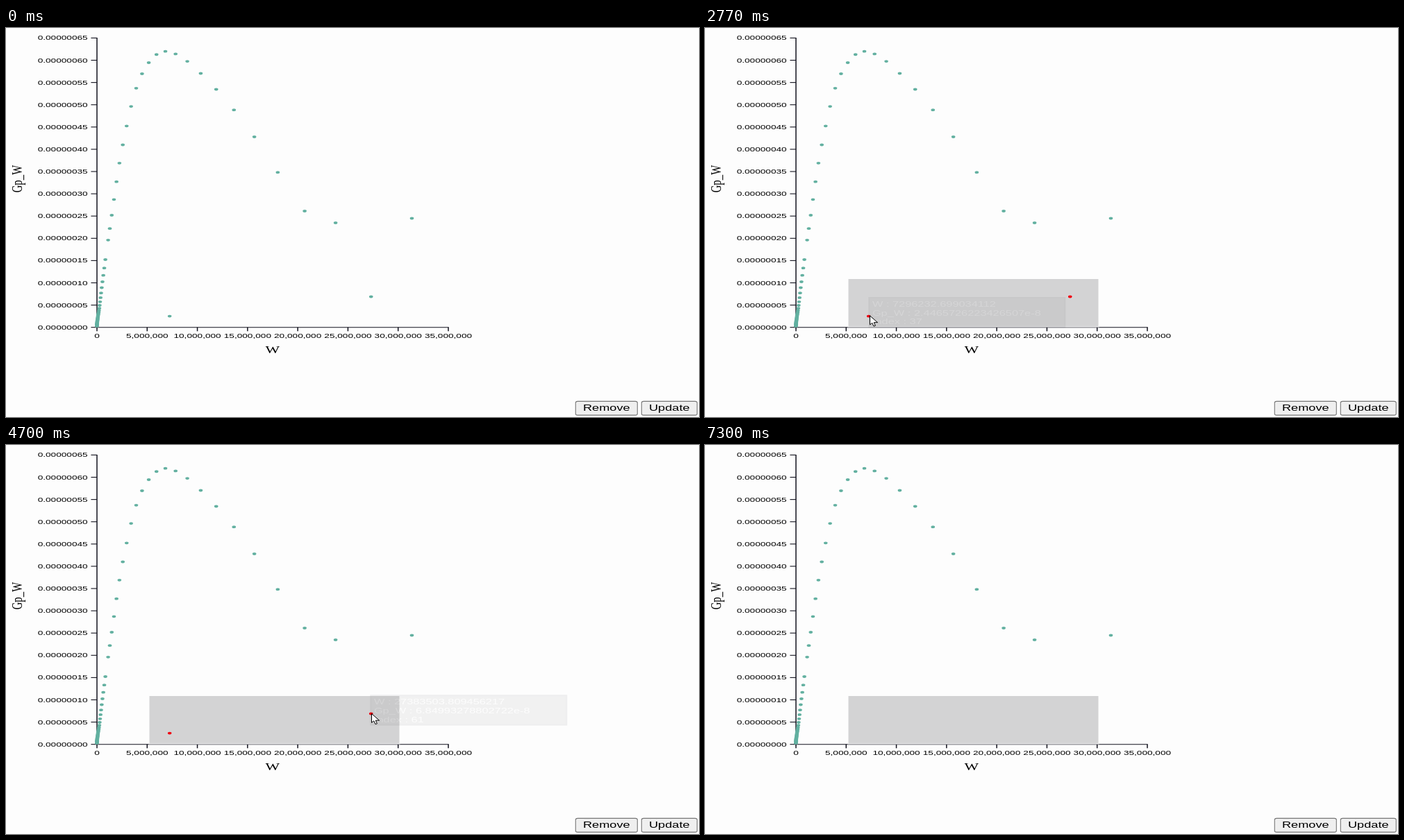
An HTML page that plays this animation: 998 by 561 pixels, repeating every 8.66 s.

```html
<!DOCTYPE html>
<html lang="en">
<head>
<meta charset="utf-8">
<title>Scatter plot with brush</title>
<style>
  html, body { margin: 0; width: 100%; height: 100%; overflow: hidden; background: #fdfdfd; }
  svg { display: block; width: 998px; height: 561px; }
  text { font: 10px "Liberation Sans", Arial, sans-serif; }
  .label { font: 16px "Liberation Serif", "Times New Roman", serif; text-anchor: middle; }
  .button { font-size: 13.333px; text-anchor: middle; }
  .button-box { fill: #efefef; stroke: #767676; stroke-width: 1.1; }
  .dot { fill: #62b0a0; }
  .dot.on { fill: #f00010; }
  #tip text { font-size: 12px; fill: #fff; }
  #arrow { fill: #fff; stroke: #000; }
  #move { fill: #fff; stroke: #222; stroke-width: 0.8; }
</style>
</head>
<body>
<svg viewBox="0 0 998 561">
  <g id="axes"></g>
  <rect id="brush" x="206" y="361.5" fill="#d3d3d4" stroke="#fdfdfd"/>
  <g id="dots"></g>
  <g id="buttons"></g>
  <g id="tip">
    <rect x="1" y="1" width="282" height="42.4" fill="#3a3a3b" stroke="#0c0c14" stroke-width="2"/>
  </g>
  <g id="cursor">
    <path id="arrow" d="M.5 .5V13.4L3.8 10.9L6 15.6L8.4 14.8L6.3 10.2H11.6Z"/>
    <path id="cross" d="M-13 0H13M0 -9V9" stroke="#000" stroke-width="2"/>
    <path id="move" d="M0 -8.6L4.5 -5H1.5V-1.5H7V-4L12.5 0L7 4V1.5H1.5V5H4.5L0 8.6L-4.5 5H-1.5V1.5H-7V4L-12.5 0L-7 -4V-1.5H-1.5V-5H-4.5Z"/>
  </g>
</svg>
<script>
const LOOP = 8660;
// The page is shown wider than it is tall
const SX = 1.364, SY = 0.927;
const LEFT = 131, TOP = 14.4, RIGHT = 637, BASE = 431.7;
const BRUSH = { left: 206, top: 361.5, right: 567, bottom: 431 };
const DRAG_START = 900, DRAG_END = 1710, REMOVED = 6700, CURSOR_IN = 30, CURSOR_OUT = 7290;
const FADE_IN = 300, FADE_OUT = 190;

const $ = id => document.getElementById(id);
const clamp = (v, lo, hi) => Math.min(hi, Math.max(lo, v));
const ease = k => k < 0.5 ? 4 * k ** 3 : 1 - 4 * (1 - k) ** 3;
const show = (el, on) => { el.style.display = on ? "" : "none"; };

function add(parent, tag, attrs) {
  const el = document.createElementNS("http://www.w3.org/2000/svg", tag);
  for (const k in attrs) el.setAttribute(k, attrs[k]);
  parent.appendChild(el);
  return el;
}

function write(parent, x, y, content, attrs = {}, turn = 0) {
  const transform = `translate(${x} ${y}) scale(${SX} ${SY}) rotate(${turn})`;
  const el = add(parent, "text", { transform, ...attrs });
  el.textContent = content;
  return el;
}

// Smooth curve through key points [t, ...values]; turning points and rests stay flat
function spline(keys, t, c = 1) {
  const last = keys.length - 1;
  t = clamp(t, keys[0][0], keys[last][0]);
  const i = clamp(keys.findIndex(k => k[0] > t) - 1, 0, last - 1);
  const j = keys[last][0] <= t ? last - 1 : i;
  const span = n => keys[n + 1][0] - keys[n][0];
  const slope = n => (keys[n + 1][c] - keys[n][c]) / span(n);
  const tangent = n => {
    if (n === 0) return slope(0);
    if (n === last) return slope(last - 1);
    const a = slope(n - 1), b = slope(n);
    return a * b <= 0 ? 0 : (a * span(n) + b * span(n - 1)) / (span(n - 1) + span(n));
  };
  const h = span(j), u = (t - keys[j][0]) / h, v = 1 - u;
  return v * v * (1 + 2 * u) * keys[j][c] + u * u * (1 + 2 * v) * keys[j + 1][c]
    + h * u * v * (v * tangent(j) - u * tangent(j + 1));
}

// Axes
const axes = $("axes");
const line = (d, width) => add(axes, "path", { d, stroke: "#10101c", "stroke-width": width, fill: "none" });
line(`M${LEFT} ${TOP - 0.5}V${BASE + 0.5}`, 1.5);
line(`M${LEFT} ${BASE}H${RIGHT + 0.7}`, 1.1);
for (let i = 0; i <= 13; i++) {
  const y = BASE - i * (BASE - TOP) / 13;
  line(`M${LEFT - 8.6} ${y}H${LEFT}`, 1.1);
  write(axes, LEFT - 13.3, y + 3, (i * 5e-8).toFixed(8), { "text-anchor": "end" });
}
for (let i = 0; i <= 7; i++) {
  const x = LEFT + i * (RIGHT - LEFT) / 7;
  line(`M${x} ${BASE}V${BASE + 5.6}`, 1.5);
  write(axes, x, 446.8, (i * 5e6).toLocaleString("en-US"), { "text-anchor": "middle" });
}
write(axes, 383.7, 469, "W", { class: "label" });
write(axes, 23, 217.6, "Gp_W", { class: "label" }, -90);

// Points run from the largest W down; W shrinks by a constant ratio
const bell = [[3, 264], [5, 157], [8, 65.5], [11, 33.7], [14, 66], [18, 168.5], [22, 270],
  [26, 334], [30, 374.5], [34, 400], [40, 415], [48, 424], [61, 430]];
const strays = { 0: 274.5, 1: 387.5, 2: 281 };
const dots = [];
function dot(x, y) {
  const el = add($("dots"), "ellipse", { class: "dot", cx: x, cy: y, rx: 2.8, ry: 1.9 });
  dots.push({ el, x, y });
}
for (let i = 0; i < 62; i++) {
  if (i === 25) dot(235.7, 415.6);
  else dot(130.8 + 453.7 * 1.1487 ** -i, strays[i] ?? spline(bell, i));
}

// Buttons
function button(x, width, name) {
  const box = add($("buttons"), "rect", { class: "button-box", x, y: 538.4, width, height: 20, rx: 3, ry: 2.2 });
  write($("buttons"), x + width / 2, 552.2, name, { class: "button" });
  return box;
}
const removeBox = button(820.3, 89, "Remove");
button(915.3, 80, "Update");

// Tooltip
const tipLines = [0, 1, 2].map(i => write($("tip"), 5.6, 14.2 + 12.6 * i, ""));
const tips = [
  { x: 235.3, y: 388, from: 2700, to: 3670,
    lines: ["W : 7296232.699034112", "Gp_W : 2.4465726223426507e-8", "Index : 37"] },
  { x: 524.3, y: 360.2, from: 4630, to: 5770,
    lines: ["W : 27383503.809456217", "Gp_W : 6.84993278802722e-8", "Index : 61"] }
];

// Pointer: time, x, y
const path = [
  [CURSOR_IN, 985, 470], [860, 206, 361.5], [DRAG_START, 206, 361.5], [1230, 253.5, 386],
  [DRAG_END, 567, 433], [1770, 567, 433], [2170, 290.5, 405.5], [2600, 237, 414.5], [3670, 237, 414.5],
  [4370, 526, 387], [5770, 526, 387], [5970, 776.5, 486], [6500, 868, 544], [7130, 868, 544], [7300, 960, 462]
];
const pointAt = t => [spline(path, t, 1), spline(path, t, 2)];

function drawBrush(t) {
  // The area trails the pointer a little
  const [x, y] = pointAt(clamp(t - 20, DRAG_START, DRAG_END));
  const right = clamp(x, BRUSH.left, BRUSH.right), bottom = clamp(y, BRUSH.top, BRUSH.bottom);
  $("brush").setAttribute("width", right - BRUSH.left);
  $("brush").setAttribute("height", bottom - BRUSH.top);
  show($("brush"), t >= DRAG_START);
  for (const d of dots) {
    const inside = t >= DRAG_START && d.x > BRUSH.left && d.x < right && d.y > BRUSH.top && d.y < bottom;
    d.el.classList.toggle("on", inside);
    show(d.el, !inside || t < REMOVED);
  }
}

function drawTip(t) {
  const tip = tips.find(p => t >= p.from && t < p.to + FADE_OUT);
  show($("tip"), tip);
  if (!tip) return;
  const shown = ease(clamp((t - tip.from) / FADE_IN, 0, 1));
  const gone = ease(clamp((t - tip.to) / FADE_OUT, 0, 1));
  $("tip").setAttribute("opacity", shown * (1 - gone));
  $("tip").setAttribute("transform", `translate(${tip.x} ${tip.y})`);
  tipLines.forEach((el, i) => { el.textContent = tip.lines[i]; });
}

function drawCursor(t) {
  const [x, y] = pointAt(t);
  const onPlot = x > LEFT && x < RIGHT && y > TOP && y < BASE + 3;
  const onDot = dots.some(d => d.el.classList.contains("on") && Math.hypot(d.x - x, d.y - y) < 4);
  const kind = onDot || !onPlot ? "arrow" : t >= 1770 && x < BRUSH.right ? "move" : "cross";
  for (const id of ["arrow", "cross", "move"]) show($(id), id === kind);
  show($("cursor"), t >= CURSOR_IN && t < CURSOR_OUT);
  $("cursor").setAttribute("transform", `translate(${x} ${y})`);
  const hover = t < CURSOR_OUT && x > 820 && x < 909 && y > 538;
  const pressed = t > REMOVED - 60 && t < REMOVED;
  removeBox.style.fill = hover ? (pressed ? "#f5f5f5" : "#e5e5e5") : "";
}

const start = performance.now();
function frame() {
  const t = (performance.now() - start) % LOOP;
  drawBrush(t);
  drawTip(t);
  drawCursor(t);
  requestAnimationFrame(frame);
}
frame();
</script>
</body>
</html>
```
